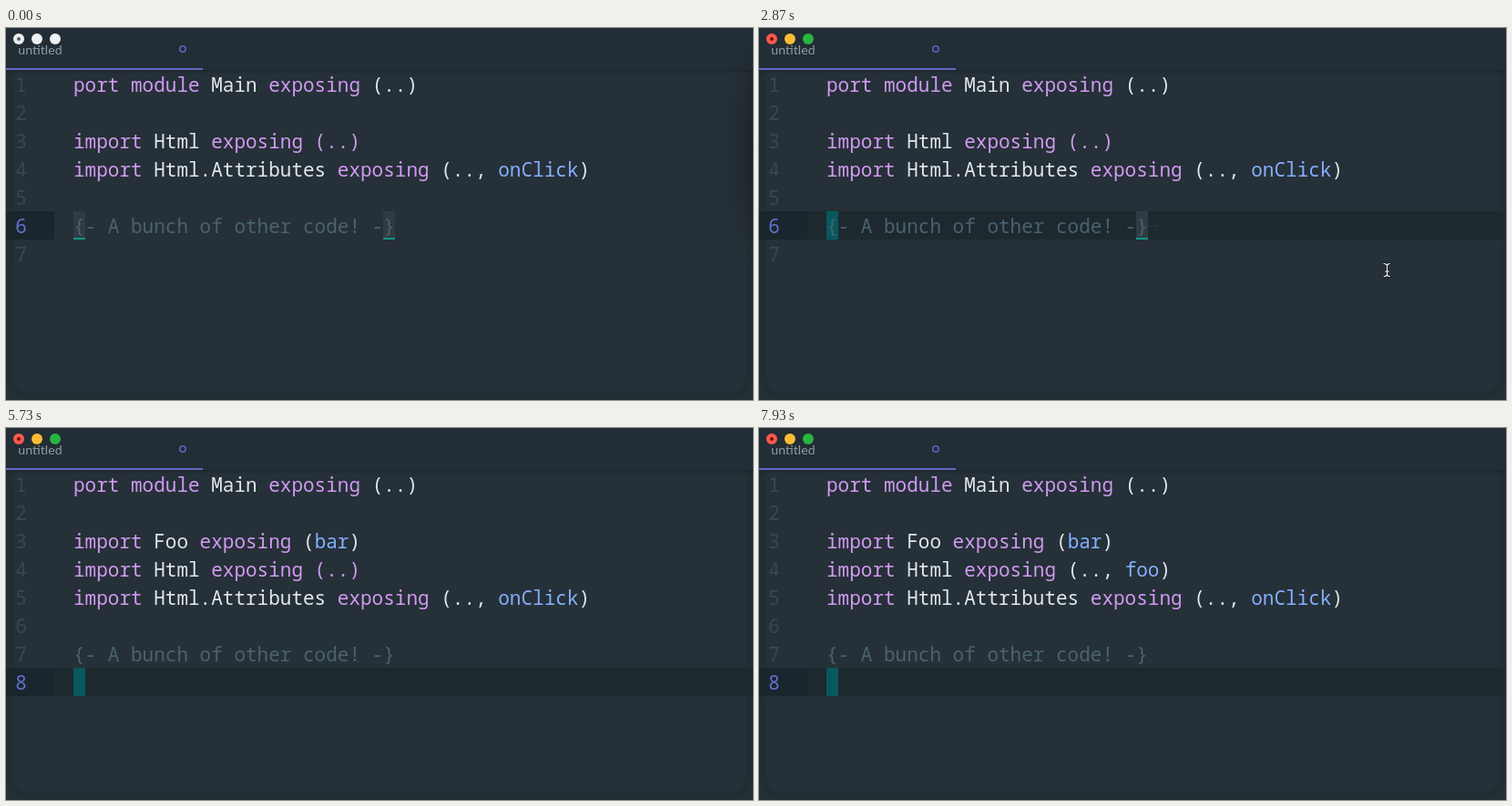
Write an HTML page that moves like this. It is 820 by 408 pixels and loops after 8 s.

```html
<!DOCTYPE html>
<html lang="en">
<head>
<meta charset="utf-8">
<title>Add import</title>
<style>
  html, body { margin: 0; width: 100%; height: 100%; overflow: hidden; background: #263038; }
  svg { display: block; width: 820px; height: 408px; }
  text { white-space: pre; }
  .code { font: 500 21px "Noto Sans Mono", "DejaVu Sans Mono", monospace; fill: #dfe7ec; font-variant-ligatures: none; }
  .ui { font-family: Lato, "Open Sans", sans-serif; fill: #8e9ba2; }
  .k { fill: #d09af1; }
  .f { fill: #84b0ff; }
  .c { fill: #4a626f; }
  .n { fill: #394750; }
  .current { fill: #6172cc; }
  .eol { fill: #28333a; }
  #modal { filter: drop-shadow(0 2px 3px rgba(0, 0, 0, .35)); }
</style>
</head>
<body>
<svg viewBox="0 0 820 408">
  <defs>
    <radialGradient id="shade">
      <stop offset="0" stop-color="#10171c" stop-opacity=".5"/>
      <stop offset="1" stop-color="#10171c" stop-opacity="0"/>
    </radialGradient>
    <linearGradient id="fall" x2="0" y2="1">
      <stop offset="0" stop-color="#141c21" stop-opacity=".4"/>
      <stop offset="1" stop-color="#141c21" stop-opacity="0"/>
    </linearGradient>
  </defs>

  <rect width="820" height="408" fill="#263038"/>
  <rect x="4" y="-30" width="812" height="434" rx="22" fill="none" stroke="#232d34" stroke-width="8"/>
  <rect id="lineBar" x="53" width="767" height="31" fill="#1e282f"/>
  <rect id="gutterBar" width="53" height="31" fill="#1b252d"/>
  <g id="brackets">
    <path d="M74 201h13v31h-13zM414 201h13v31h-13z" fill="#303b43"/>
    <path d="M74 231h13M414 231h13" stroke="#0f9688" stroke-width="2"/>
  </g>
  <rect id="block" x="74" width="13" height="31" fill="#07595b"/>
  <g id="before" class="code"></g>
  <g id="added" class="code"></g>
  <g id="extended" class="code"></g>
  <text id="eol" class="code eol" x="427" y="224.5">¬</text>

  <rect width="820" height="46" fill="#232d35"/>
  <rect y="46" width="820" height="5" fill="url(#fall)"/>
  <rect y="44" width="216" height="2" fill="#5c6cc4"/>
  <text class="ui" x="13.3" y="29" font-size="14.2">untitled</text>
  <circle cx="194" cy="23" r="3.2" fill="none" stroke="#5567c0" stroke-width="1.5"/>
  <ellipse id="behind" cx="838" cy="135" rx="58" ry="135" fill="url(#shade)"/>
  <g id="lights">
    <circle cx="14" cy="12" r="6"/>
    <circle cx="34" cy="12" r="6"/>
    <circle cx="54" cy="12" r="6"/>
  </g>
  <circle id="dot" cx="14" cy="12" r="2"/>

  <g id="modal" class="ui">
    <rect x="176" y="-10" width="500" height="187" fill="#263038"/>
    <text x="193.8" y="33" font-size="17.3">Module name and optional symbol separated by a space</text>
    <text id="input" x="194" y="62" font-size="21"></text>
    <rect id="caret" y="42" width="1.3" height="24" fill="#a3afb5"/>
    <rect x="194" y="70" width="464" height="1.2" fill="#e6ebee"/>
    <text id="moduleName" x="193.7" y="126" font-size="21.65"></text>
    <text id="symbolName" x="193.7" y="156" font-size="21.65"></text>
  </g>

  <path id="arrow" d="M0 0v14.5l3.4-3.2 2.3 5.2 2.5-1.1-2.2-5.1h4.8z" fill="#000" stroke="#fff" stroke-width="1.1"/>
  <g id="beam" fill="none" stroke-linecap="round">
    <path d="M686 258.5q3 0 3.5 2q.5-2 3-2M689.5 260v11M686 272.5q3 0 3.5-2q.5 2 3 2M687.5 267h4" stroke="#131a1e" stroke-width="3"/>
    <path d="M686 258.5q3 0 3.5 2q.5-2 3-2M689.5 260v11M686 272.5q3 0 3.5-2q.5 2 3 2M687.5 267h4" stroke="#f2f5f6" stroke-width="1.2"/>
  </g>
</svg>
<script>
const LOOP = 8000, ROW = 31, TOP = 46;
const FOCUS = 1870, POINTER_IN = 400, POINTER_REST = 860;
const BLOCK_BLINK = 400, CARET_BLINK = 500;

// Each session: when the prompt opens and closes, and [time, key] strokes.
const sessions = [
  { open: 3070, close: 4900, keys: [[3870, 'F'], [4000, 'o'], [4130, 'o'], [4270, ' '], [4400, 'b'], [4530, 'a'], [4670, 'r']] },
  { open: 5930, close: 7870, keys: [[6270, 'H'], [6400, 't'], [6530, 'm'], [6670, 'l'], [7330, ' '], [7470, 'f'], [7600, 'o'], [7700, 'o']] }
];

const $ = id => document.getElementById(id);
const show = (id, on) => $(id).setAttribute('visibility', on ? 'visible' : 'hidden');
const blinkOn = (elapsed, half) => Math.floor(elapsed / half) % 2 === 0;

const span = (kind, s) => `<tspan class="${kind}">${s}</tspan>`;
const k = s => span('k', s), f = s => span('f', s), c = s => span('c', s);

const header = [k('port module') + ' Main ' + k('exposing') + ' (..)', ''];
const foo = k('import') + ' Foo ' + k('exposing') + ' (' + f('bar') + ')';
const html = k('import') + ' Html ' + k('exposing (..)');
const htmlFoo = k('import') + ' Html ' + k('exposing') + ' (.., ' + f('foo') + ')';
const footer = [
  k('import') + ' Html.Attributes ' + k('exposing') + ' (.., ' + f('onClick') + ')',
  '', c('{- A bunch of other code! -}'), ''
];

function fillCode(id, lines, current) {
  $(id).innerHTML = lines.map((line, i) => {
    const y = TOP + ROW * i + 23.5;
    const kind = i + 1 === current ? 'current' : 'n';
    return `<text class="${kind}" x="10.3" y="${y}">${i + 1}</text><text x="74" y="${y}">${line}</text>`;
  }).join('');
}
fillCode('before', [...header, html, ...footer], 6);
fillCode('added', [...header, foo, html, ...footer], 8);
fillCode('extended', [...header, foo, htmlFoo, ...footer], 8);

function drawPrompt({ open, keys }, t) {
  const typed = keys.filter(([at]) => at <= t);
  const value = typed.map(([, key]) => key).join('');
  const [name, symbol] = value.split(' ');
  const lastInput = typed.length ? typed[typed.length - 1][0] : open;
  $('input').textContent = value;
  $('moduleName').textContent = 'Module name: ' + name;
  $('symbolName').textContent = 'Symbol name: ' + (symbol || 'none');
  $('caret').setAttribute('x', 194 + (value ? $('input').getComputedTextLength() : 0));
  show('caret', blinkOn(t - lastInput, CARET_BLINK));
}

function drawPointer(t) {
  const p = Math.min(1, Math.max(0, (t - POINTER_IN) / (POINTER_REST - POINTER_IN)));
  const left = (1 - p) ** 3;
  $('arrow').setAttribute('transform', `translate(${689 + 102 * left} ${265 - 50 * left})`);
  show('arrow', t >= POINTER_IN && t < FOCUS);
  show('beam', t >= FOCUS && t < sessions[0].keys[0][0]);
}

function draw(t) {
  const session = sessions.find(s => t >= s.open && t < s.close);
  const done = sessions.filter(s => t >= s.close);
  const active = t >= FOCUS;
  const editing = active && !session;
  const focusedAt = done.length ? done[done.length - 1].close : FOCUS;
  const barY = TOP + ROW * (done.length ? 7 : 5);

  ['before', 'added', 'extended'].forEach((id, i) => show(id, i === done.length));
  ['lineBar', 'gutterBar', 'block'].forEach(id => $(id).setAttribute('y', barY));
  show('lineBar', editing);
  show('block', editing && blinkOn(t - focusedAt, BLOCK_BLINK));
  show('brackets', !done.length);
  show('eol', editing && !done.length);
  show('behind', !active);

  const colours = active ? ['#fc5a50', '#fdbc34', '#28b540'] : ['#eef0f1', '#eef0f1', '#eef0f1'];
  [...$('lights').children].forEach((light, i) => light.setAttribute('fill', colours[i]));
  $('dot').setAttribute('fill', active ? '#6e0d08' : '#555b5f');

  $('modal').style.display = session ? '' : 'none';
  if (session) drawPrompt(session, t);
  drawPointer(t);
}

const start = performance.now();
function tick() {
  draw((performance.now() - start) % LOOP);
  requestAnimationFrame(tick);
}
tick();
</script>
</body>
</html>
```
